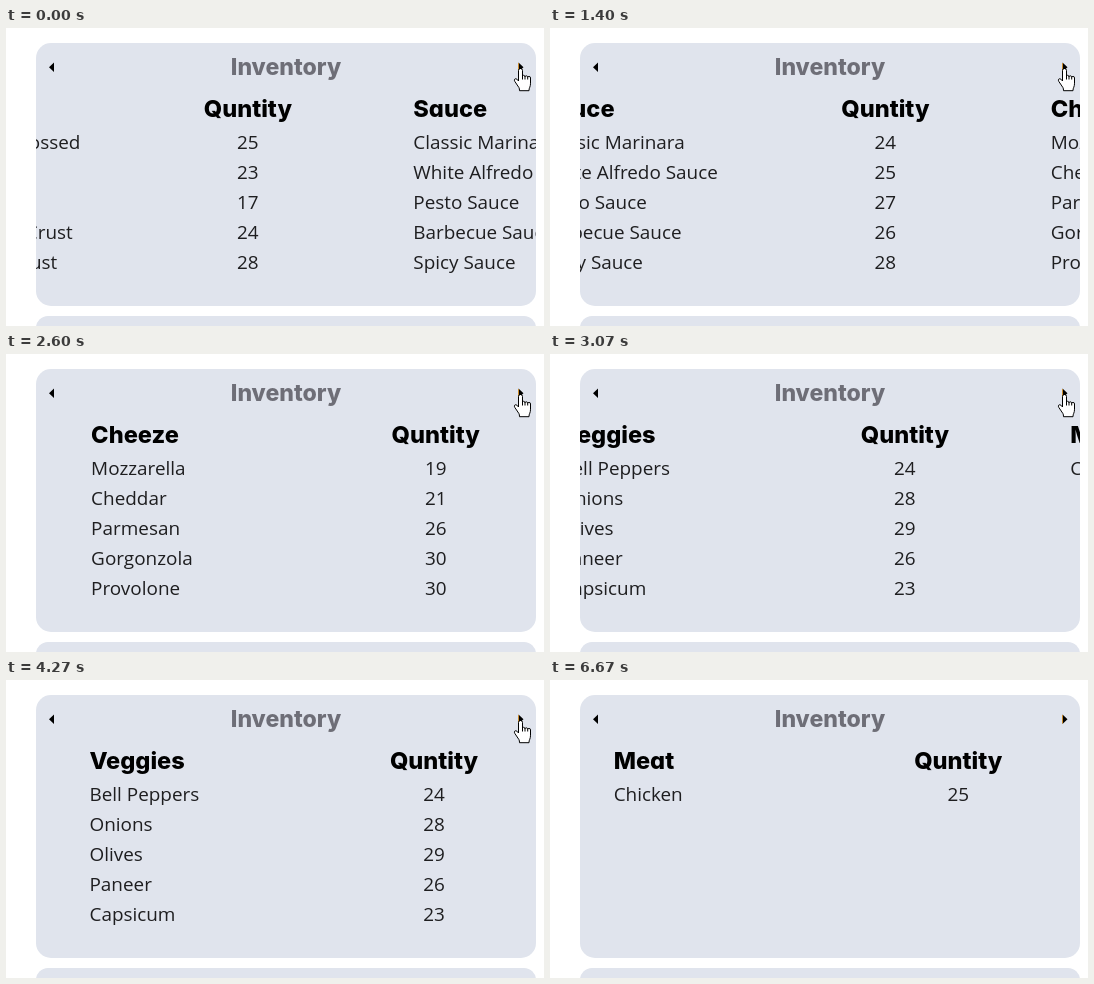
Animation of 538 by 298 pixels, one loop 6.87 s. Source, as an HTML page:

```html
<!DOCTYPE html>
<html lang="en">
<head>
<meta charset="utf-8">
<title>Inventory</title>
<style>
  html, body { margin: 0; width: 100%; height: 100%; overflow: hidden; background: #fff; }
  svg { display: block; }
  .card { fill: #e0e4ed; }
  .title, .head { font-family: Inter, "Open Sans", sans-serif; font-weight: 800; font-feature-settings: "cv11"; }
  .title { font-size: 23.1px; fill: #6e6e77; }
  .head { font-size: 23.6px; fill: #000; }
  .row { font: 400 18.9px "Open Sans", "Noto Sans", sans-serif; fill: #1e1e20; }
  .mid { text-anchor: middle; }
</style>
</head>
<body>
<svg width="538" height="298" viewBox="0 0 538 298">
  <defs>
    <clipPath id="cardClip"><rect x="30" y="15" width="500" height="263" rx="15"/></clipPath>
  </defs>
  <rect class="card" x="30" y="15" width="500" height="263" rx="15"/>
  <rect class="card" x="30" y="288" width="500" height="60" rx="12"/>
  <text class="title mid" x="280" y="47">Inventory</text>
  <g clip-path="url(#cardClip)"><g id="track"></g></g>
  <path d="M43 39.2L48 34.5V44Z M517.5 39.2L512.5 34.5V44Z"/>
  <path d="M512.5 35v8.5" stroke="#c98a2b"/>
  <g id="cursor" stroke="#000" stroke-linejoin="round">
    <path fill="#fff" d="M514.5 40.5q-2 0-2 2V53l-1.6-1.8q-1.2-1-2.2 0q-.7.9.1 2.2l4.2 6.3q.5 1 .5 3h9.5q0-2 .8-3.5q.7-1.5.7-4V50q0-1.6-1.4-1.6q-1.2 0-1.4.8q-.3-1.4-1.3-1.4q-1.2 0-1.4.8q-.3-1.3-1.4-1.3q-.7 0-1.1.4V42.5q0-2-2-2z"/>
    <path fill="none" d="M516.5 47v4.5M519 48v3.5M521.7 49v2.5"/>
  </g>
</svg>
<script>
const LOOP = 6870, STEP = 200 / 3, LAST_STEP = 100;
const PITCH = 510, SLIDE_MS = 1000, CURSOR_OUT = 5530;
const BACK = 'cubic-bezier(.68, -.6, .32, 1.6)';
const clicks = [-464, 984, 2274, 3938];

const slides = [
  ['Crust', 'Classic Hand Tossed', 25, 'Thin Crust', 23, 'Cheese Burst', 17, 'Whole Wheat Crust', 24, 'Gluten Free Crust', 28],
  ['Sauce', 'Classic Marinara', 24, 'White Alfredo Sauce', 25, 'Pesto Sauce', 27, 'Barbecue Sauce', 26, 'Spicy Sauce', 28],
  ['Cheeze', 'Mozzarella', 19, 'Cheddar', 21, 'Parmesan', 26, 'Gorgonzola', 30, 'Provolone', 30],
  ['Veggies', 'Bell Peppers', 24, 'Onions', 28, 'Olives', 29, 'Paneer', 26, 'Capsicum', 23],
  ['Meat', 'Chicken', 25]
];

const track = document.getElementById('track');
const cursor = document.getElementById('cursor');

function addText(text, x, y, className) {
  const node = document.createElementNS('http://www.w3.org/2000/svg', 'text');
  node.setAttribute('x', x);
  node.setAttribute('y', y);
  node.setAttribute('class', className);
  node.textContent = text;
  track.append(node);
}

slides.forEach(([name, ...items], i) => {
  const left = 63.7 + i * PITCH, center = 408.3 + i * PITCH;
  addText(name, left, 89, 'head');
  addText('Quntity', center, 89, 'head mid');
  for (let k = 0; k < items.length; k += 2) {
    const y = 121 + 15 * k;
    addText(items[k], left, y, 'row');
    addText(items[k + 1], center, y, 'row mid');
  }
});

// The first slide change is already under way when the loop starts.
const lead = -clicks[0], span = LOOP + lead;
const at = (time, index, easing = 'linear') => ({
  offset: (time + lead) / span,
  transform: `translateX(${-PITCH * index}px)`,
  easing
});
const motion = track.animate([
  ...clicks.flatMap((time, i) => [at(time, i, BACK), at(time + SLIDE_MS, i + 1)]),
  at(LOOP, clicks.length)
], { duration: span, fill: 'both' });
motion.pause();

const began = performance.now();
function draw() {
  const elapsed = (performance.now() - began) % LOOP;
  // Hold each pose for one step of the 15 per second rhythm.
  const time = Math.min(LAST_STEP, Math.floor((elapsed + 4) / STEP)) * STEP;
  motion.currentTime = time + lead;
  cursor.style.visibility = time < CURSOR_OUT ? 'visible' : 'hidden';
  requestAnimationFrame(draw);
}
draw();
</script>
</body>
</html>
```
